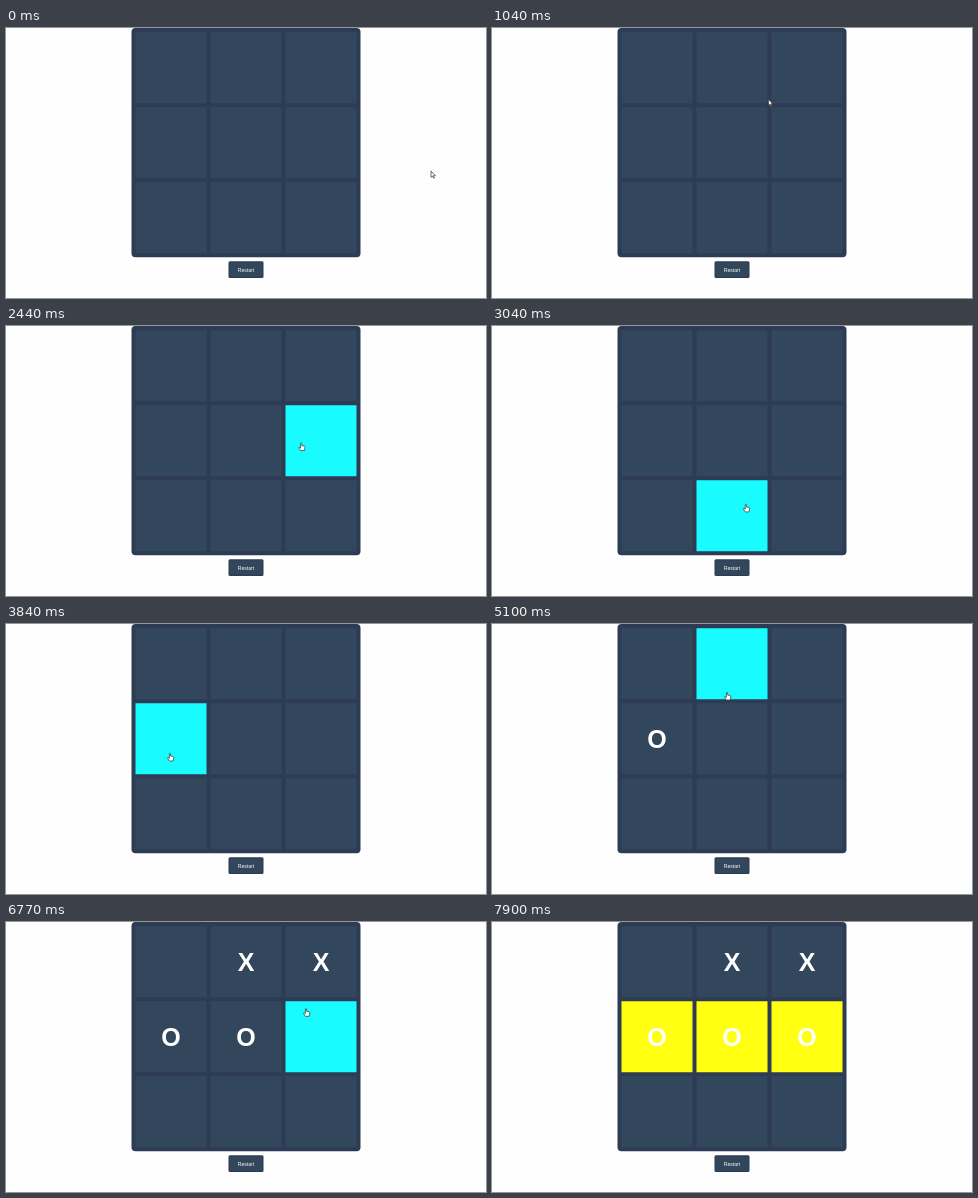
An HTML page with a canvas for the animation above (8 s loop, 480 by 270 pixels).

```html
<!DOCTYPE html>
<html lang="en">
<head>
<meta charset="utf-8">
<title>Tic-tac-toe</title>
<style>
html, body { margin: 0; width: 100%; height: 100%; overflow: hidden; background: #fefefe; }
canvas { display: block; }
</style>
</head>
<body>
<canvas width="480" height="270"></canvas>
<script>
{
const ctx = document.querySelector('canvas').getContext('2d');
const LOOP = 8000, SIZE = 71, WIN = 6840, BLINK = 760;
const EDGE = '#2d3b54', CELL = [51, 71, 92], YELLOW = [255, 255, 15], HOVER = '#18fcff';

// Pointer stops: arrival time, x, y and, where it rests, departure time
const stops = [
  [0, 425, 143, 500], [900, 312, 92], [1300, 222, 45], [1700, 184.5, 95], [2170, 236, 122],
  [2450, 296, 118], [2800, 284, 230], [3040, 254, 178], [3400, 190, 176], [3840, 164, 129, 4040],
  [4840, 209, 75, 4970], [5100, 235, 68, 5440], [5840, 244, 116], [6240, 275, 68],
  [6500, 300, 50], [6770, 300, 86], [7100, 300, 232, 7240], [7650, 310, 280, LOOP]
];

// Moves: time, column, row, mark
const moves = [
  [4040, 0, 1, 'O'], [5300, 1, 0, 'X'], [5900, 1, 1, 'O'], [6500, 2, 0, 'X'], [WIN, 2, 1, 'O']
];

const cellX = c => 129.5 + 75 * c;
const cellY = r => 4.3 + 75 * r;
const leave = stop => stop[3] ?? stop[0];

function box(x, y, w, h, radius, fill) {
  ctx.fillStyle = fill;
  ctx.beginPath();
  ctx.roundRect(x, y, w, h, radius);
  ctx.fill();
}

function text(str, x, y, font) {
  ctx.font = font + ' "Liberation Sans", Arial, sans-serif';
  ctx.fillStyle = '#fff';
  ctx.textAlign = 'center';
  ctx.fillText(str, x, y);
}

// Velocity at a stop; zero where the pointer rests
function slope(i, axis) {
  if (stops[i][3]) return 0;
  const a = stops[i - 1], b = stops[i + 1];
  return (b[axis] - a[axis]) / (b[0] - leave(a));
}

// Cubic Hermite curve through the stops
function pointer(t) {
  const i = stops.findLastIndex(s => s[0] <= t), a = stops[i], b = stops[i + 1];
  if (t <= leave(a)) return [a[1], a[2]];
  const d = b[0] - leave(a), u = (t - leave(a)) / d, s = u * u * (3 - 2 * u);
  return [1, 2].map(k => a[k] + (b[k] - a[k]) * s +
    d * u * (1 - u) * ((1 - u) * slope(i, k) - u * slope(i + 1, k)));
}

function shape(d, x, y) {
  const p = new Path2D(d);
  ctx.save();
  ctx.translate(x, y);
  ctx.fillStyle = '#fff';
  ctx.strokeStyle = '#333';
  ctx.lineWidth = 0.7;
  ctx.fill(p);
  ctx.stroke(p);
  ctx.restore();
}

const ARROW = 'M0 0V6.3L1.5 5L2.5 7.2L3.5 6.8L2.5 4.6H4.3Z';
const HAND = 'M-.6 .6Q0 -.4 .6 .6V3L3.2 3.6Q4 3.8 3.8 4.8L3.2 8H-.6L-2.5 5.2Q-2.4 4.2 -1.4 4.8L-.6 5.4Z';

function draw(t) {
  const [px, py] = pointer(t);
  const pulse = (1 - Math.cos((t - 6770) / BLINK * 2 * Math.PI)) / 2;
  const glow = CELL.map((v, i) => Math.round(v + (YELLOW[i] - v) * pulse));
  let over = false;

  ctx.fillStyle = '#fefefe';
  ctx.fillRect(0, 0, 480, 270);
  box(125.5, 0, 229, 229.3, 4, EDGE);
  for (let r = 0; r < 3; r++) for (let c = 0; c < 3; c++) {
    const x = cellX(c), y = cellY(r);
    const hit = px >= x && px < x + SIZE && py >= y && py < y + SIZE;
    over ||= hit;
    const fill = r === 1 && t >= WIN ? `rgb(${glow})` : hit ? HOVER : `rgb(${CELL})`;
    box(x, y, SIZE, SIZE, 0, fill);
  }
  for (const [at, c, r, mark] of moves)
    if (t >= at) text(mark, cellX(c) + SIZE / 2, cellY(r) + 44.5, 'bold 25px');

  box(222.5, 233.3, 35, 16.7, 1.5, EDGE);
  box(223.7, 234.5, 32.6, 14.3, 0.5, `rgb(${CELL})`);
  text('Restart', 240, 243.5, '5.1px');
  shape(over ? HAND : ARROW, px, py);
}

function tick() {
  draw(performance.now() % LOOP);
  requestAnimationFrame(tick);
}
tick();
}
</script>
</body>
</html>
```
